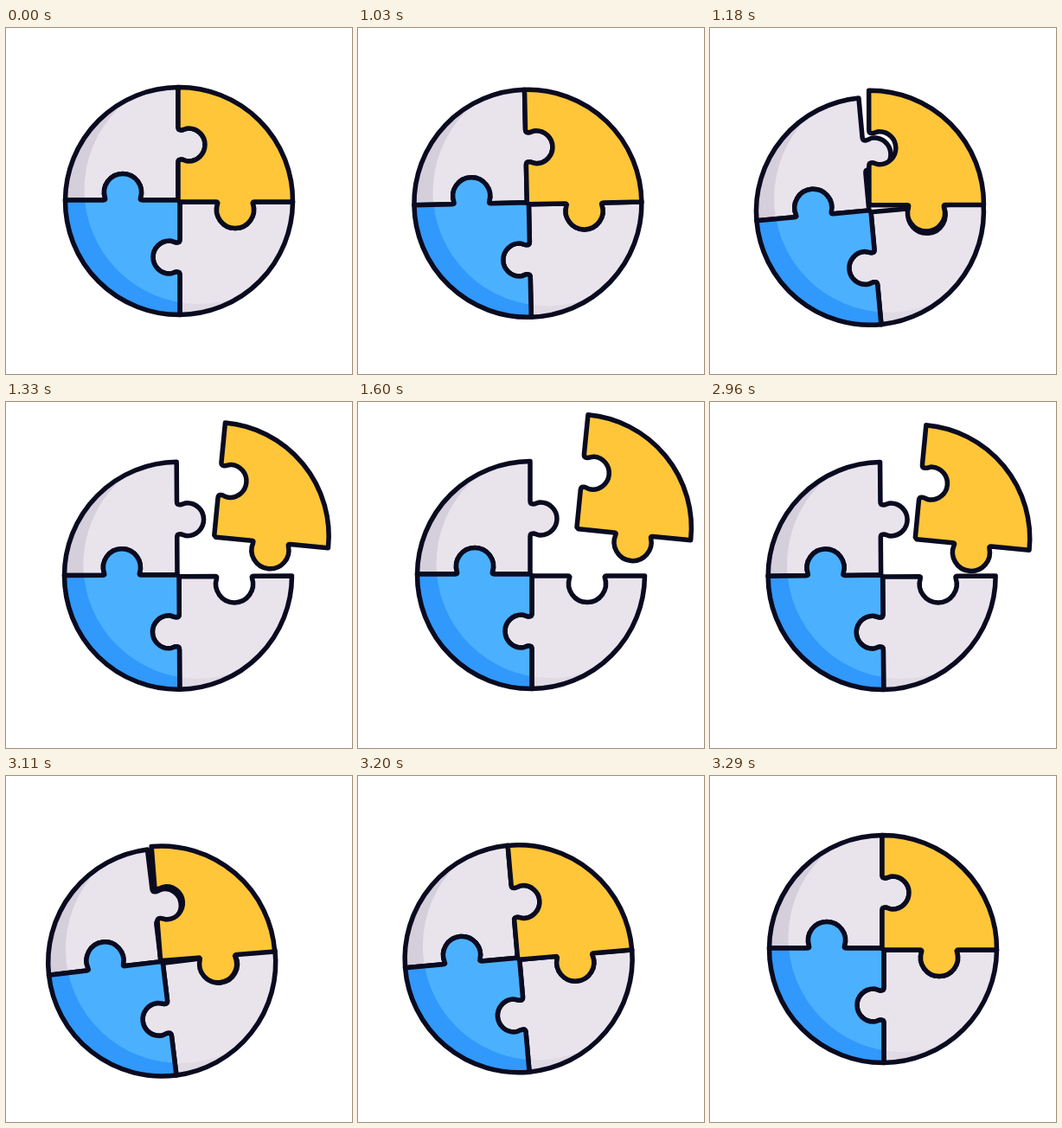
Animation of 400 by 400 pixels, one loop 3.32 s. Source, as an HTML page with a canvas:

```html
<!DOCTYPE html>
<html lang="en">
<head>
<meta charset="utf-8">
<title>Puzzle circle</title>
<style>
  html, body { margin: 0; width: 100%; height: 100%; overflow: hidden; background: #fff; }
  canvas { display: block; }
</style>
</head>
<body>
<canvas id="stage" width="400" height="400"></canvas>
<script>
const ctx = document.getElementById('stage').getContext('2d');
const LOOP = 3320, RISE = 120, TRAVEL = 600;

// Left seam runs left to right with a knob upwards; upper seam runs upwards with a knob to the right.
const leftSeam = 'H112.5 Q115.5 199 114.6 196.8 A21.5 21.5 0 1 1 155.4 196.8 Q154.5 199 157.5 199 H199';
const upperSeam = 'V155.5 Q199 152 202.5 152 C206 152 207 154 211 154 ' +
  'A19 19 0 0 0 211 116 C207 116 206 118 202.5 118 Q199 118 199 114.5 V68.5';
const lowerSeam = 'L201 201 V244.5 Q201 248 197.5 248 C194 248 193 246 189 246 ' +
  'A19 19 0 0 0 189 284 C193 284 194 282 197.5 282 Q201 282 201 285.5 V331.5';

const upperLeft = new Path2D(`M199 68.5 A131.5 131.5 0 0 0 68.5 199 ${leftSeam} ${upperSeam} Z`);
const lowerLeft = new Path2D(`M68.5 199 ${leftSeam} ${lowerSeam} A131.5 131.5 0 0 1 68.5 199 Z`);

// The opposite pieces are the same shapes turned by half a circle.
function halfTurn(path) {
  const turned = new Path2D();
  turned.addPath(path, new DOMMatrix([-1, 0, 0, -1, 400, 400]));
  return turned;
}
const lowerRight = halfTurn(upperLeft);
const upperRight = halfTurn(lowerLeft);

const lit = new Path2D();
lit.arc(222.5, 187, 132, 0, Math.PI * 2);

function drawPiece(path, light, shade) {
  ctx.fillStyle = shade;
  ctx.fill(path);
  ctx.save();
  ctx.clip(path);
  ctx.fillStyle = light;
  ctx.fill(lit);
  ctx.restore();
  ctx.stroke(path);
}

function posed(x, y, degrees, pivotX, pivotY, draw) {
  ctx.save();
  ctx.translate(pivotX + x, pivotY + y);
  ctx.rotate(degrees * Math.PI / 180);
  ctx.translate(-pivotX, -pivotY);
  draw();
  ctx.restore();
}

const mix = (a, b, k) => a + (b - a) * k;
const smooth = u => u * u * (3 - 2 * u);

// Soft start, quick middle and a long settling tail; half way at time `half`.
function settle(time, half, power) {
  const raw = s => s ** power / (s ** power + half ** power);
  return raw(time) / raw(TRAVEL - RISE);
}

// Position along the separation: forwards, then the same way back, in 30 ms steps.
function separation(t) {
  const step = ms => Math.floor(ms / 30) * 30;
  const s = t < 2150 ? step(t - 1000) : 610 - step(t - 2660);
  return Math.max(0, Math.min(TRAVEL, s));
}

function render(t) {
  const s = separation(t);
  const rise = smooth(Math.min(1, s / RISE));
  const free = Math.max(0, s - RISE);
  const recoil = rise * (1 - settle(free, 75, 2.9));
  const flight = settle(free, 114, 2.7);
  const turn = settle(free, 55, 3.4);

  ctx.fillStyle = '#fff';
  ctx.fillRect(0, 0, 400, 400);
  ctx.strokeStyle = '#0a0b20';
  ctx.lineWidth = 5.5;
  ctx.lineJoin = ctx.lineCap = 'round';

  posed(-23 * recoil, 18 * recoil, -8 * recoil, 200, 200, () => {
    drawPiece(lowerRight, '#e9e4ec', '#e0dae4');
    drawPiece(upperLeft, '#e9e4ec', '#d5cedb');
    drawPiece(lowerLeft, '#4bb1fe', '#3198fc');
  });
  posed(mix(-28.2 * rise, 57.2, flight), mix(13.5 * rise, -50.6, flight),
    mix(-8 * rise, 5.7, turn), 235, 165,
    () => drawPiece(upperRight, '#ffc63a', '#ffc63a'));
}

const start = performance.now();
function tick() {
  render((performance.now() - start) % LOOP);
  requestAnimationFrame(tick);
}
tick();
</script>
</body>
</html>
```
